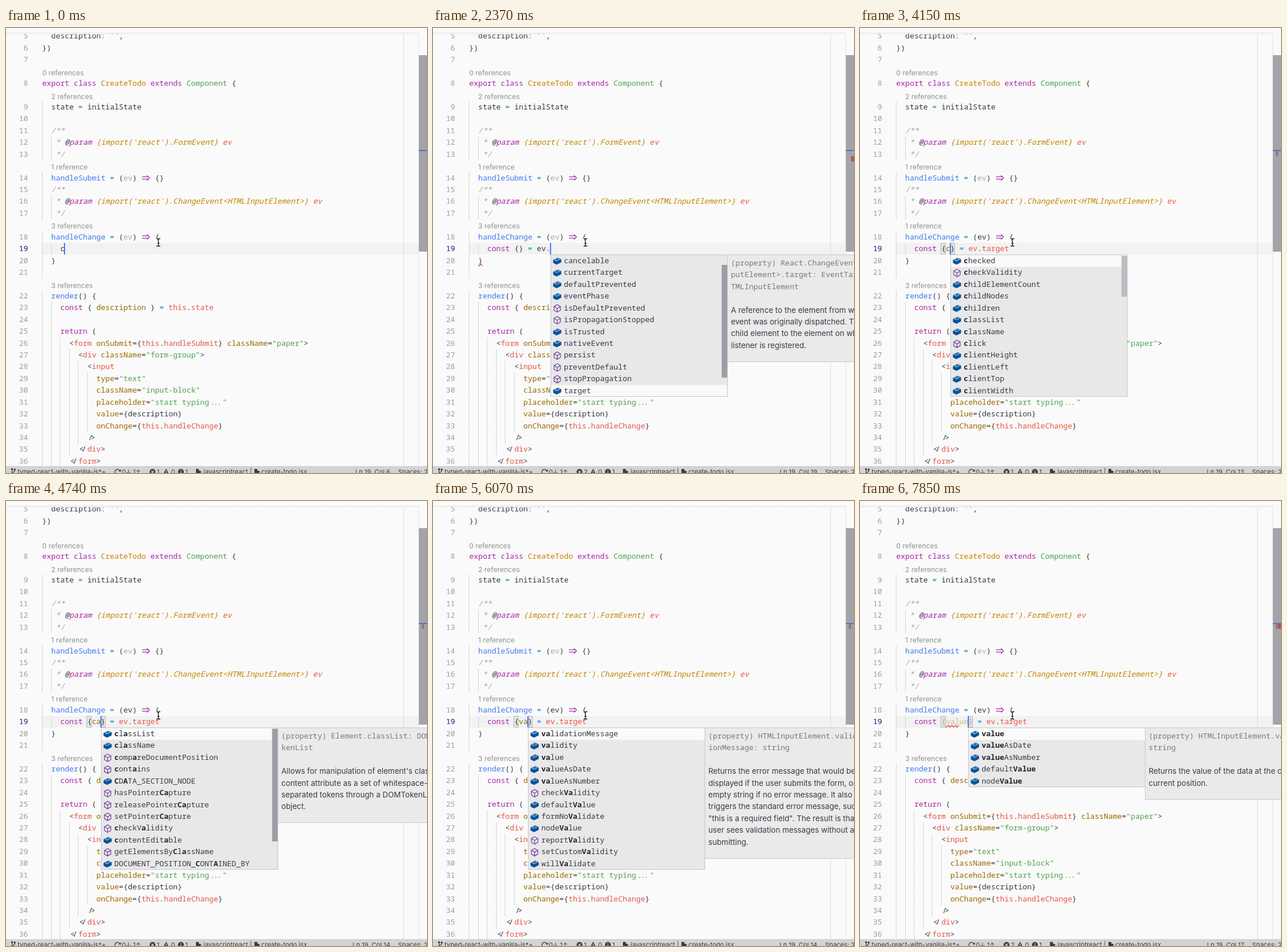
These frames come from a looping animation (727x770 px, 8 s). An HTML page with a canvas:

```html
<!DOCTYPE html>
<html lang="en">
<head>
<meta charset="utf-8">
<title>Editor typing</title>
<style>
  html, body { margin: 0; width: 100%; height: 100%; overflow: hidden; background: #fafafa; }
  canvas { display: block; }
</style>
</head>
<body>
<canvas id="stage" width="727" height="770"></canvas>
<script>
const ctx = document.getElementById('stage').getContext('2d');
const W = 727, H = 770, LOOP = 8000;
const ROW = 20.43, TOP = 4.1, LEFT = 62.5, CW = 7.79;
const MONO = '"Noto Sans Mono", "DejaVu Sans Mono", monospace';
const SANS = 'Inter, "Open Sans", sans-serif';
const BAR = '#d3d3d5';

// Upper case keys are the italic versions.
const INK = {
  d: '#383a42', p: '#a626a4', y: '#c18401', g: '#50a14f', b: '#0184bc',
  f: '#4078f2', r: '#e45649', o: '#986801', c: '#a0a1a7', u: '#a9aaae', v: '#cbb98c'
};

const paramDoc = type => [
  '  §C/**', `   §C* §D@§Pparam §Y{import('react').${type}} §Rev`, '   §C*/'
];
const attr = (name, value) => `            §o${name}§d=${value}`;

const ROWS = [
  "  §ddescription§b: §g''§d,", '§d})', '', '#0 references',
  '§pexport class §yCreateTodo §pextends §gComponent §d{',
  '#  2 references', '  §dstate §b= §dinitialState', '',
  ...paramDoc('FormEvent'), '#  1 reference',
  '  §fhandleSubmit §b= §d(§uev§d) §p⇒  §d{}',
  ...paramDoc('ChangeEvent<HTMLInputElement>'), '#  refs', 'param', 'typed',
  '  §d}', '', '#  3 references',
  '  §frender§d() {',
  '    §pconst §d{ §odescription §d} §b= §rthis§d.§rstate', '',
  '    §preturn §d(',
  '      §d<§rform §oonSubmit§d={§rthis§d.§rhandleSubmit§d} §oclassName§d=§g"paper"§d>',
  '        §d<§rdiv §oclassName§d=§g"form-group"§d>',
  '          §d<§rinput',
  attr('type', '§g"text"'), attr('className', '§g"input-block"'),
  attr('placeholder', '§g"start typing..."'), attr('value', '{description}'),
  attr('onChange', '{§rthis§d.§rhandleChange§d}'),
  '          §d/>', '        §d</§rdiv§d>', '      §d</§rform§d>'
];
const ACTIVE = ROWS.indexOf('typed');

// Popup items: a leading * is a method, [..] is the matched part.
const list = (items, extra = {}) => ({ items: items.split(' '), sel: 0, ...extra });
const doc = (sign, text) => ({ sign: sign.split('\n'), text: text.split('\n') });

const targetDoc = doc('(property) React.ChangeEvent<HTMLIn\nputElement>.target: EventTarget & H\nTMLInputElement',
  'A reference to the element from which the\nevent was originally dispatched. This is the\nchild element to the element on which the\nlistener is registered.');
const listDoc = doc('(property) Element.classList: DOMTo\nkenList',
  "Allows for manipulation of element's class\ncontent attribute as a set of whitespace-\nseparated tokens through a DOMTokenList\nobject.");
const checkDoc = doc('(property) HTMLInputElement.checke\nd: boolean',
  'Sets or retrieves the state of the check box or\nradio button.');
const validDoc = doc('(property) HTMLInputElement.validat\nionMessage: string',
  'Returns the error message that would be\ndisplayed if the user submits the form, or an\nempty string if no error message. It also\ntriggers the standard error message, such as\n"this is a required field". The result is that the\nuser sees validation messages without actually\nsubmitting.');
const valueDoc = doc('(property) HTMLInputElement.value:\nstring',
  'Returns the value of the data at the cursor\'s\ncurrent position.');

const evList = list('cancelable currentTarget defaultPrevented eventPhase *isDefaultPrevented *isPropagationStopped isTrusted nativeEvent *persist *preventDefault *stopPropagation target',
  { sel: 11, bar: [17, 212, '#9b9ea6'], doc: targetDoc });
const tList = list('[t]arget [t]imeStamp [t]ype current[T]arget is[T]rusted', { doc: targetDoc });
const taList = list('[ta]rget current[Ta]rget', { doc: targetDoc });
const cList = list('[c]hecked *[c]heckValidity [c]hildElementCount [c]hildNodes [c]hildren [c]lassList [c]lassName *[c]lick [c]lientHeight [c]lientLeft [c]lientTop [c]lientWidth',
  { bar: [1, 72, '#bbbdc2'], doc: checkDoc });
const caList = list('[c]l[a]ssList [c]l[a]ssName *[c]omp[a]reDocumentPosition *[c]ont[a]ins [C]D[A]TA_SECTION_NODE *hasPointer[Ca]pture *releasePointer[Ca]pture *setPointer[Ca]pture *[c]heckV[a]lidity [c]ontentEdit[a]ble *getElementsBy[C]l[a]ssName DOCUMENT_POSITION_[C]ONT[A]INED_BY',
  { bar: [1, 196, '#9b9ea6'], doc: listDoc });
const vItems = k => 'validationMessage validity value valueAsDate valueAsNumber *checkValidity defaultValue formNoValidate nodeValue *reportValidity *setCustomValidity willValidate'
  .replace(new RegExp(k, 'gi'), '[$&]');
const vaList = list(vItems('va'), { doc: validDoc });
const valList = list(vItems('val'), { doc: validDoc });
const valueList = list('[value] [value]AsDate [value]AsNumber default[Value] node[Value]', { doc: valueDoc });
const noDoc = l => ({ ...l, doc: null });

// Time, line text with | as the caret, settings. err: row of the error; wave: [column, length].
const nameErr = (n, more) => ({ err: 0, wave: [11, n], dim: 1, ...more });
const STEPS = [
  [0, 'c|'], [300, 'co|'], [440, 'con|'], [590, 'cons|'], [740, 'const|'], [880, 'const |'],
  [1030, 'const {|}'],
  [1330, 'const {}|', { err: 0, wave: [10, 2] }],
  [1480, 'const {} |', { err: 0, wave: [10, 2] }],
  [1780, 'const {} =|', { err: 0, wave: [10, 2] }],
  [1930, 'const {} = |', { err: 1 }],
  [2070, 'const {} = e|', { err: 1 }],
  [2220, 'const {} = ev|', { err: 1 }],
  [2370, 'const {} = ev.|', { err: 1, pop: evList }],
  [2510, 'const {} = ev.t|', { err: 1, pop: tList }],
  [2660, 'const {} = ev.ta|', { err: 0, wave: [18, 2], pop: taList }],
  [2960, 'const {} = ev.target|', { err: 0, wave: [18, 2] }],
  [3250, 'const {} = ev.|target'], [3400, 'const {} = |ev.target'],
  [3550, 'const {} |= ev.target'], [3700, 'const {|} = ev.target'],
  [4000, 'const {c|} = ev.target'],
  [4150, 'const {c|} = ev.target', { pop: noDoc(cList) }],
  [4300, 'const {c|} = ev.target', { pop: cList }],
  [4440, 'const {ca|} = ev.target', { pop: noDoc(caList) }],
  [4590, 'const {ca|} = ev.target', { pop: caList }],
  [5030, 'const {ca|} = ev.target', nameErr(2, { pop: caList })],
  [5180, 'const {ca|} = ev.target', nameErr(2, { pop: caList, bulb: 1 })],
  [5330, 'const {c|} = ev.target', nameErr(1, { pop: noDoc(cList), bulb: 1 })],
  [5470, 'const {c|} = ev.target', nameErr(1, { pop: cList, bulb: 1 })],
  [5620, 'const {|} = ev.target', { err: 0, bulb: 1 }],
  [5920, 'const {v|} = ev.target'],
  [6070, 'const {va|} = ev.target', { pop: vaList }],
  [6210, 'const {val|} = ev.target', { pop: valList }],
  [6660, 'const {val|} = ev.target', nameErr(3, { pop: valList, bulb: 1, hide: 1 })],
  [7260, 'const {val|} = ev.target', nameErr(3, { pop: valList, bulb: 1 })],
  [7560, 'const {valu|} = ev.target', nameErr(3, { pop: noDoc(valueList) })],
  [7710, 'const {value|} = ev.target', nameErr(3, { pop: noDoc(valueList) })],
  [7850, 'const {value|} = ev.target', nameErr(3, { pop: valueList })]
];

const rowY = n => TOP + n * ROW;
const colX = c => LEFT + c * CW;

function box(x, y, w, h, fill) {
  ctx.fillStyle = fill;
  ctx.fillRect(x, y, w, h);
}
function frameBox(x, y, w, h, color) {
  ctx.strokeStyle = color;
  ctx.lineWidth = 1;
  ctx.strokeRect(x, y, w, h);
}
function text(s, x, y, fill, font, align = 'left') {
  ctx.font = font;
  ctx.fillStyle = fill;
  ctx.textAlign = align;
  ctx.fillText(s, x, y);
}
function path(points, color, width, close) {
  ctx.beginPath();
  points.forEach(([x, y], i) => i ? ctx.lineTo(x, y) : ctx.moveTo(x, y));
  if (close) ctx.closePath();
  if (width) {
    ctx.strokeStyle = color;
    ctx.lineWidth = width;
    ctx.stroke();
  } else {
    ctx.fillStyle = color;
    ctx.fill();
  }
}
function dot(x, y, r, fill) {
  ctx.beginPath();
  ctx.arc(x, y, r, 0, 7);
  ctx.fillStyle = fill;
  ctx.fill();
}

function arrow(x, y, color) {
  path([[x + 1, y - 2], [x + 12, y - 2]], color, 1.2);
  path([[x + 1, y + 2], [x + 12, y + 2]], color, 1.2);
  path([[x + 9.5, y - 4.5], [x + 14, y], [x + 9.5, y + 4.5]], color, 1.2);
}

// Coding ligatures are pulled together by a small shift.
function run(s, x, y, fill, font) {
  const tight = s.match(/^(.*?)(\.\.\.|<\/|\/>)(.*)$/);
  if (!tight) return text(s, x, y, fill, font);
  const [, a, lig, b] = tight;
  const pull = lig.length === 3 ? 2 : 1.8;
  text(a, x, y, fill, font);
  [...lig].forEach((ch, i) => {
    const shift = pull * (1 - 2 * i / (lig.length - 1));
    text(ch, x + (a.length + i) * CW + shift, y, fill, font);
  });
  text(b, x + (a.length + lig.length) * CW, y, fill, font);
}

function code(line, n) {
  let col = 0;
  line.split('§').forEach((part, i) => {
    const s = i ? part.slice(1) : part;
    if (i) {
      const key = part[0], low = key.toLowerCase();
      const font = (key === low ? '' : 'italic ') + '13px ' + MONO;
      if (s[0] === '⇒') arrow(colX(col), rowY(n) + 10.2, INK[low]);
      else run(s, colX(col), rowY(n) + 14.3, INK[low], font);
    }
    col += s.length;
  });
}

function typedLine(s, dim) {
  const parts = s.match(/^(const)?( )?(\{)?(\w*)(\})?( )?(=)?( )?(\w*)(\.)?(\w*)/);
  const [, kw, , open, name, shut, , eq, , obj, dotCh, prop] = parts;
  const brace = dim ? '§u' : '§d';
  let out = '    ';
  if (!kw) return out + '§d' + s;
  out += '§pconst ';
  if (open) out += `${brace}{§${dim ? 'v' : 'o'}${name}${brace}${shut} `;
  if (eq) out += '§b= ';
  if (obj) out += `§${prop ? 'r' : 'd'}${obj}`;
  if (dotCh) out += `§d.§r${prop}`;
  return out;
}

function wave(col, len, n) {
  const pts = [], x0 = colX(col), y = rowY(n) + 18;
  for (let x = 0; x <= len * CW; x += 0.5) pts.push([x0 + x, y + 1.5 * Math.sin(x * Math.PI / 3)]);
  path(pts, '#e0342c', 1.2);
}

function guides() {
  let indent = 0;
  ROWS.forEach((line, n) => {
    if (line[0] === '#' || n < 6) return;
    if (line === 'param') indent = 2;
    else if (line === 'typed') indent = 4;
    else if (line) indent = line.search(/[^ ]/);
    else indent = n > 22 ? 4 : 2;
    for (let c = 0; c < indent; c += 2) box(Math.round(colX(c) - 0.5), rowY(n), 1, ROW, '#d6d6d8');
  });
}

function brick(x, y, back) {
  path([[x + 1, y - 6], [x - 7, y - 2], [x - 7, y + 3], [x - 1, y + 6], [x + 7, y + 2], [x + 7, y - 3]], '#00539c', 0, true);
  path([[x - 1, y - 0.1], [x - 4.8, y - 2], [x + 1, y - 4.9], [x + 4.8, y - 3]], back, 0, true);
  path([[x - 1, y - 1], [x - 3.4, y - 2.2], [x + 1, y - 4.4], [x + 3.4, y - 3.2]], '#00539c', 0, true);
}
function cube(x, y) {
  const c = '#652d90';
  path([[x, y - 6.5], [x + 5.5, y - 3.3], [x + 5.5, y + 3.3], [x, y + 6.5], [x - 5.5, y + 3.3], [x - 5.5, y - 3.3]], c, 1.1, true);
  path([[x - 5.5, y - 3.3], [x, y], [x + 5.5, y - 3.3]], c, 1.1);
  path([[x, y], [x, y + 6.5]], c, 1.1);
}

function popup(p, x) {
  const y = 393, w = 305, h = Math.round(p.items.length * ROW) - 1;
  const back = '#e8e8e9', lit = '#fafafa';
  if (p.doc) details(p.doc, x + w, y);
  box(x, y, w, h, back);
  box(x, y + p.sel * ROW, w, Math.min(ROW, h - p.sel * ROW), lit);
  p.items.forEach((item, i) => {
    const cy = y + 10 + i * ROW;
    const method = item[0] === '*';
    (method ? cube : brick)(x + 11.5, cy + 0.5, i === p.sel ? lit : back);
    let col = 0;
    item.replace('*', '').split(/[\[\]]/).forEach((s, k) => {
      text(s, x + 23 + col * CW, cy + 4, k % 2 ? '#202229' : INK.d, (k % 2 ? 'bold ' : '') + '13px ' + MONO);
      col += s.length;
    });
  });
  if (p.bar) box(x + w - 9.5, y + p.bar[0], 9.5, p.bar[1] - p.bar[0], p.bar[2]);
  frameBox(x + 0.5, y - 0.5, w, h + 1, '#c8c8ca');
}

function details(d, x, y) {
  const rows = d.sign.length + d.text.length + 1;
  const h = Math.round((rows + 1) * ROW);
  box(x, y, W - x, h, '#eaeaeb');
  frameBox(x + 0.5, y - 0.5, W, h + 1, '#c8c8ca');
  d.sign.forEach((s, i) => text(s, x + 6.5, y + 17.8 + i * ROW, '#77787d', '13px ' + MONO));
  d.text.forEach((s, i) => text(s, x + 6.5, y + 17.8 + (d.sign.length + 1 + i) * ROW, INK.d, '13.2px ' + SANS));
}

function bracket(col) {
  const x = Math.round(colX(col));
  box(x, 372, 8, 20, '#dfe6df');
  frameBox(x - 0.5, 372.5, 8, 19, '#b9b9b9');
}

function bulb() {
  const x = 72.5, y = 378.5;
  dot(x, y, 5, '#fccc3a');
  box(x - 2.5, y + 3, 5, 3, '#fccc3a');
  box(x - 2, y + 6, 4, 1, '#8a8a8a');
  box(x - 2, y + 8, 4, 1, '#8a8a8a');
}

function mouse() {
  const ibeam = (color, width) => {
    path([[260, 364.5], [262, 364.5], [263.2, 366], [264.4, 364.5], [266.4, 364.5]], color, width);
    path([[260, 377.5], [262, 377.5], [263.2, 376], [264.4, 377.5], [266.4, 377.5]], color, width);
    path([[263.2, 366], [263.2, 376]], color, width);
    path([[261.5, 372.5], [265, 372.5]], color, width);
  };
  ibeam('#ffffff', 3);
  ibeam('#111111', 1.3);
}

function status(col, errors) {
  const ink = '#3c3c3f', font = '11px ' + SANS, base = 772;
  const put = (s, x, align) => text(s, x, base, ink, font, align);
  box(0, 758, W, 12, BAR);
  path([[10.5, 764], [10.5, 770]], ink, 1.2);
  path([[15, 765], [15, 767], [10.5, 770]], ink, 1.2);
  dot(10.5, 763.5, 1.7, ink);
  dot(15, 764, 1.7, ink);
  put('typed-react-with-vanilla-js*+', 20);
  ctx.beginPath();
  ctx.arc(192.5, 768, 4.3, 2.6, 6);
  ctx.strokeStyle = ink;
  ctx.lineWidth = 1.4;
  ctx.stroke();
  path([[198.5, 763.5], [198.5, 767.5], [194.5, 767.5]], ink, 0, true);
  put('0↓ 1↑', 200);
  dot(253, 768, 5, ink);
  path([[251, 766], [255, 770]], BAR, 1.3);
  path([[255, 766], [251, 770]], BAR, 1.3);
  put(errors, 260.5);
  path([[276.5, 762.5], [282, 773], [271, 773]], ink, 0, true);
  box(276, 766, 1.2, 4, BAR);
  put('0', 285);
  dot(302, 768, 5, ink);
  box(301.3, 765, 1.5, 1.5, BAR);
  box(301.3, 767.5, 1.5, 3, BAR);
  put('1', 309.5);
  for (const x of [328, 429]) {
    path([[x, 763], [x + 5, 763], [x + 5, 766], [x + 8, 766], [x + 8, 770], [x, 770]], ink, 0, true);
    path([[x + 4, 769], [x + 10, 768]], ink, 1.2);
  }
  put('javascriptreact', 341);
  put('|', 421);
  put('create-todo.jsx', 441);
  put('Ln 19, Col ' + col, 663.5, 'right');
  put('Spaces: 2', 677);
}

function draw(time) {
  const [t, raw, opt = {}] = STEPS.filter(s => s[0] <= time).pop();
  const caret = raw.indexOf('|') + 4;
  const line = raw.replace('|', '');
  const failing = opt.err !== undefined;
  const open = line.indexOf('{') + 4, shut = line.indexOf('}') + 4;
  const matched = open > 3 && caret > open && caret <= shut + 1;

  box(0, 0, W, H, '#fafafa');
  box(62, 372, 650, 20, '#f2f2f2');
  box(686, 9, 1, 749, '#dcdcde');
  guides();
  if (matched) [open, shut].forEach(bracket);

  let num = 5;
  ROWS.forEach((src, n) => {
    if (src[0] === '#') {
      const refs = src === '#  refs' ? (t < 3250 ? '  3 references' : '  1 reference') : src.slice(1);
      const label = refs.trimStart();
      text(label, colX(refs.length - label.length), rowY(n) + 16.5, '#8f9095', '12px ' + SANS);
      return;
    }
    if (src === 'param') code(`  §fhandleChange §b= §d(§${t < 2510 ? 'u' : 'd'}ev§d) §p⇒  §d{`, n);
    else if (src === 'typed') code(typedLine(line, opt.dim), n);
    else code(src, n);
    text(num++, 38, rowY(n) + 14.3, n === ACTIVE ? '#0b216f' : '#9d9d9f', '13px ' + MONO, 'right');
  });

  if (opt.wave) wave(...opt.wave, ACTIVE);
  if (opt.err === 1) wave(2, 1, ACTIVE + 1);
  if (!opt.hide) box(Math.round(colX(caret)) - 1, 372, 2, 20, '#526fff');
  if (opt.bulb) bulb();

  box(0, 0, W, 8, '#fafafa');
  const shade = ctx.createLinearGradient(0, 8, 0, 13);
  shade.addColorStop(0, '#e6e6e6');
  shade.addColorStop(1, '#fafafa00');
  box(0, 8, 713, 5, shade);

  box(712, 9, 1, 749, '#e6e6e7');
  box(713, 47, 14, 340, '#a2a4aa');
  box(713, 211, 14, 2, '#6668c6');
  if (matched) box(718, 212, 4, 9, '#7e8086');
  if (failing) box(722, opt.err ? 222 : 212, 5, 9, '#b94f59');

  if (opt.pop) popup(opt.pop, Math.round(colX(caret)));
  mouse();
  status(caret + 1, failing ? 2 : 1);
}

const start = performance.now();
function frame() {
  draw((performance.now() - start) % LOOP);
  requestAnimationFrame(frame);
}
frame();
</script>
</body>
</html>
```
